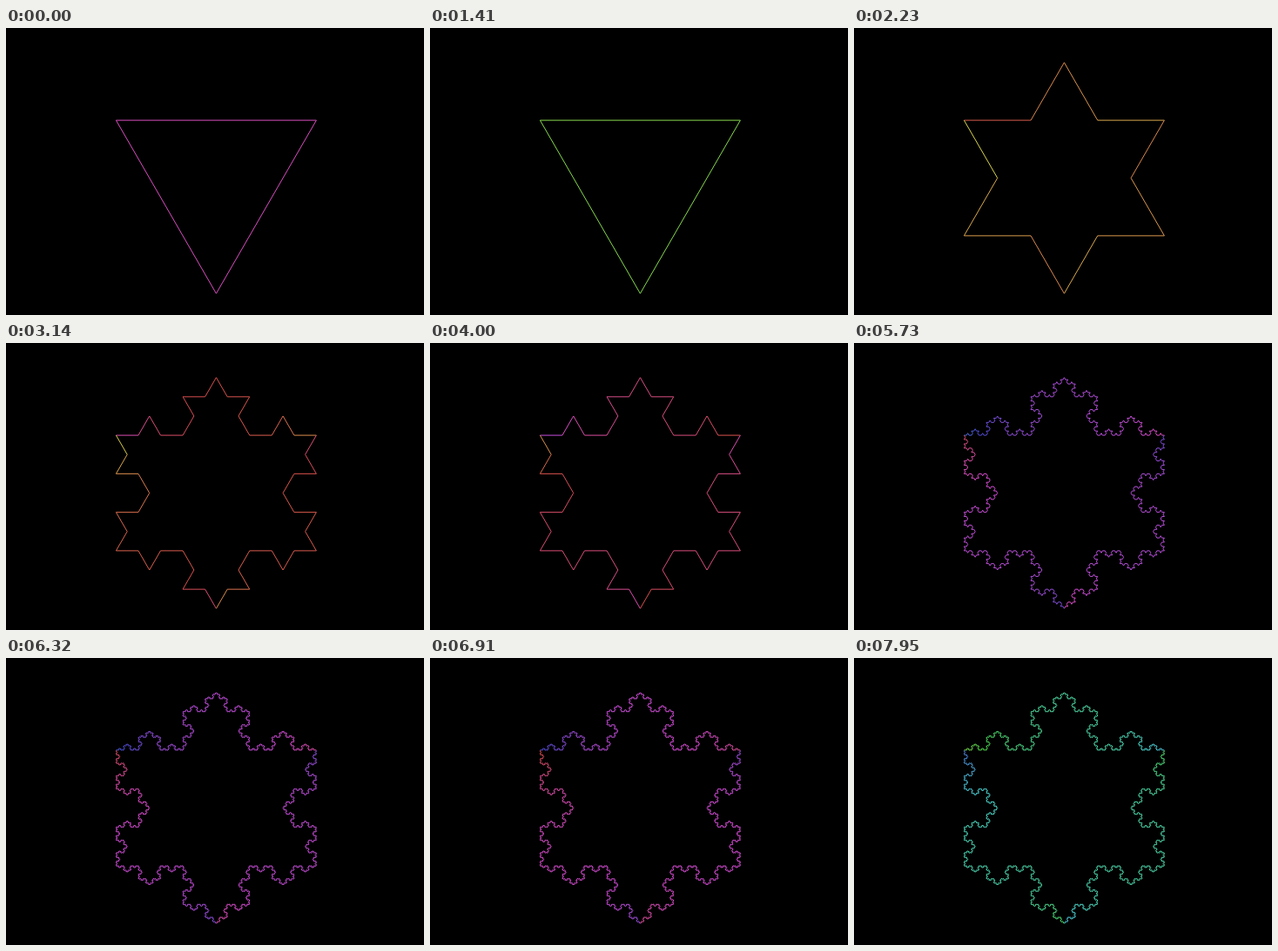
An HTML page with a canvas that plays this animation: 480 px wide and 330 px high, repeating every 8 s.

```html
<!DOCTYPE html>
<html lang="en">
<head>
<meta charset="utf-8">
<title>Koch snowflake</title>
<style>
  html, body { margin: 0; width: 100%; height: 100%; overflow: hidden; background: #000; }
  canvas { display: block; }
</style>
</head>
<body>
<canvas id="stage" width="480" height="330"></canvas>
<script>
const ctx = document.getElementById('stage').getContext('2d');
const LOOP = 8000, FPS = 22, MAX_LEVEL = 5;
const FIRST_SPLIT = 1900, SPLIT_EVERY = 1100;
const LEFT = 126.4, RIGHT = 356.4, TOP = 106.1;
const corners = [[LEFT, TOP], [RIGHT, TOP], [(LEFT + RIGHT) / 2, TOP + (RIGHT - LEFT) * Math.sqrt(3) / 2]];

// Time in ms and base hue
const hueKeys = [[0, 310], [1410, 95], [2230, 32], [4000, -20], [5730, -75], [6910, -60], [7950, -205], [8000, -212]];

function baseHue(t) {
  const i = Math.max(1, hueKeys.findIndex(k => k[0] >= t));
  const [t0, h0] = hueKeys[i - 1], [t1, h1] = hueKeys[i];
  return h0 + (h1 - h0) * (t - t0) / (t1 - t0);
}

// Replace each edge with four, the middle pair pointing outward
function split(points) {
  const out = [];
  for (let i = 0; i < points.length - 1; i++) {
    const [x, y] = points[i];
    const dx = (points[i + 1][0] - x) / 3, dy = (points[i + 1][1] - y) / 3;
    const s = Math.sqrt(3) / 2;
    out.push(
      [x, y],
      [x + dx, y + dy],
      [x + 1.5 * dx + s * dy, y + 1.5 * dy - s * dx],
      [x + 2 * dx, y + 2 * dy]
    );
  }
  out.push(points[points.length - 1]);
  return out;
}

const levels = [[...corners, corners[0]]];
while (levels.length <= MAX_LEVEL) levels.push(split(levels[levels.length - 1]));

// Hue shifts towards the ends of each side and of the whole outline
function hueShift(i, count) {
  if (count === 3) return 0;
  const p = (i + 0.5) / count, u = (p * 3) % 1;
  return 30 * (2 * u - 1) ** 5 + 30 * (2 * p - 1) ** 5;
}

function draw(t) {
  const level = t < FIRST_SPLIT ? 0 : Math.min(MAX_LEVEL, 1 + Math.floor((t - FIRST_SPLIT) / SPLIT_EVERY));
  const points = levels[level], count = points.length - 1, hue = baseHue(t);
  ctx.fillStyle = '#000';
  ctx.fillRect(0, 0, 480, 330);
  ctx.lineWidth = 1;
  for (let i = 0; i < count; i++) {
    const h = (hue + hueShift(i, count) + 720) % 360;
    ctx.strokeStyle = `hsl(${h.toFixed(1)}, 65%, 58%)`;
    ctx.beginPath();
    ctx.moveTo(...points[i]);
    ctx.lineTo(...points[i + 1]);
    ctx.stroke();
  }
}

const start = performance.now();
let shown = -1;
function tick() {
  const t = (performance.now() - start) % LOOP;
  const step = Math.floor((t + 1) * FPS / 1000);
  if (step !== shown) {
    shown = step;
    draw(Math.min(LOOP, step * 1000 / FPS));
  }
  requestAnimationFrame(tick);
}
tick();
</script>
</body>
</html>
```
